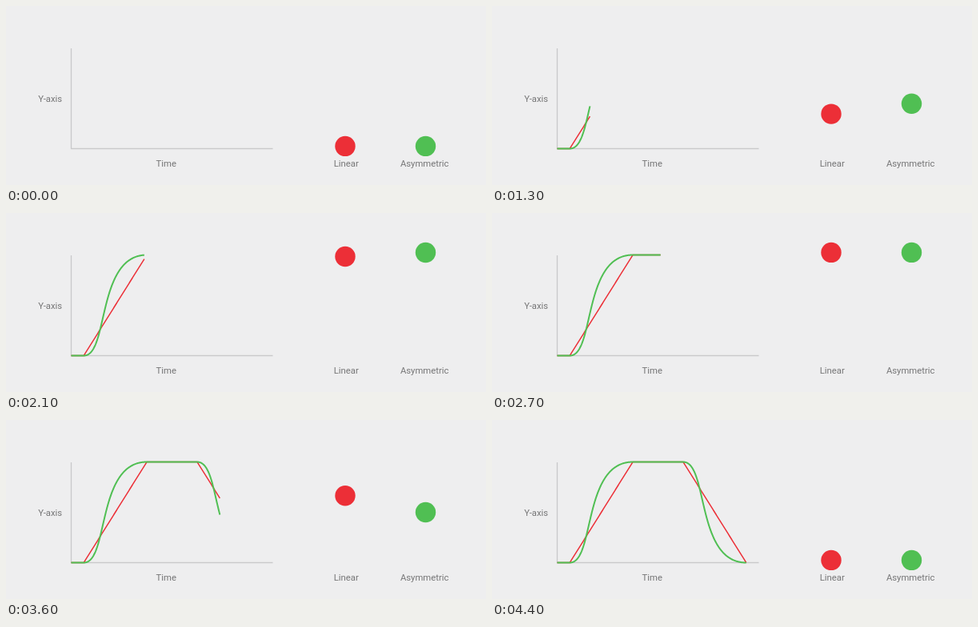
An HTML page that plays this animation: 600x224 px, repeating every 4.5 s.

```html
<!DOCTYPE html>
<html lang="en">
<head>
<meta charset="utf-8">
<title>Linear and asymmetric easing</title>
<style>
  html, body { margin: 0; width: 100%; height: 100%; overflow: hidden; background: #eeeeef; }
  svg { display: block; }
  text { font: 11.3px Roboto, sans-serif; fill: #757576; text-anchor: middle; }
  path { fill: none; }
  .axes { stroke: #c9c9cb; stroke-width: 1.3; }
  .red { --hue: #ec2f37; stroke-width: 1.5; }
  .green { --hue: #50bf53; stroke-width: 2; }
  path.red, path.green { stroke: var(--hue); stroke-linejoin: round; }
  circle { fill: var(--hue); }
</style>
</head>
<body>
<svg width="600" height="224" viewBox="0 0 600 224">
  <path class="axes" d="M81.5 53V178.5H333.5"/>
  <text x="55.2" y="119.5">Y-axis</text>
  <text x="200.3" y="200.7">Time</text>
  <text x="425.2" y="200.7">Linear</text>
  <text x="523.2" y="200.7">Asymmetric</text>
  <path class="red" id="linearPath"/>
  <path class="green" id="curvedPath"/>
  <circle class="red" id="linearBall" cx="424" r="12.7"/>
  <circle class="green" id="curvedBall" cx="524.5" r="12.7"/>
</svg>
<script>
const LOOP = 4500, STEP = 100;
const PLOT_START = 650, RISE = 900, FALL = 3150, MOVE = 1250;
const LEFT = 81.5, BASE = 178.5, HEIGHT = 126, SPEED = 0.063, BALL_BASE = 175.4;

const clamp = v => Math.min(1, Math.max(0, v));
const linear = p => p;

// cubic-bezier(.4, 0, .2, 1), solved by bisection
function asymmetric(p) {
  let low = 0, high = 1;
  for (let i = 0; i < 20; i++) {
    const s = (low + high) / 2, r = 1 - s;
    if (1.2 * s * r * r + 0.6 * s * s * r + s ** 3 < p) low = s;
    else high = s;
  }
  return low * low * (3 - 2 * low);
}

const level = (ease, t) =>
  ease(clamp((t - RISE) / MOVE)) - ease(clamp((t - FALL) / MOVE));

function plot(ease, end) {
  if (end <= PLOT_START) return "";
  const point = t =>
    `${LEFT + (t - PLOT_START) * SPEED} ${BASE - HEIGHT * level(ease, t)}`;
  const points = [];
  for (let t = PLOT_START; t < end; t += 10) points.push(point(t));
  points.push(point(end));
  return "M" + points.join("L");
}

function show(name, ease, t) {
  document.getElementById(name + "Path").setAttribute("d", plot(ease, t));
  document.getElementById(name + "Ball")
    .setAttribute("cy", BALL_BASE - HEIGHT * level(ease, t));
}

// The motion advances ten times a second
function draw() {
  const t = Math.floor((performance.now() + 1) % LOOP / STEP) * STEP;
  show("linear", linear, t);
  show("curved", asymmetric, t);
  requestAnimationFrame(draw);
}
draw();
</script>
</body>
</html>
```
